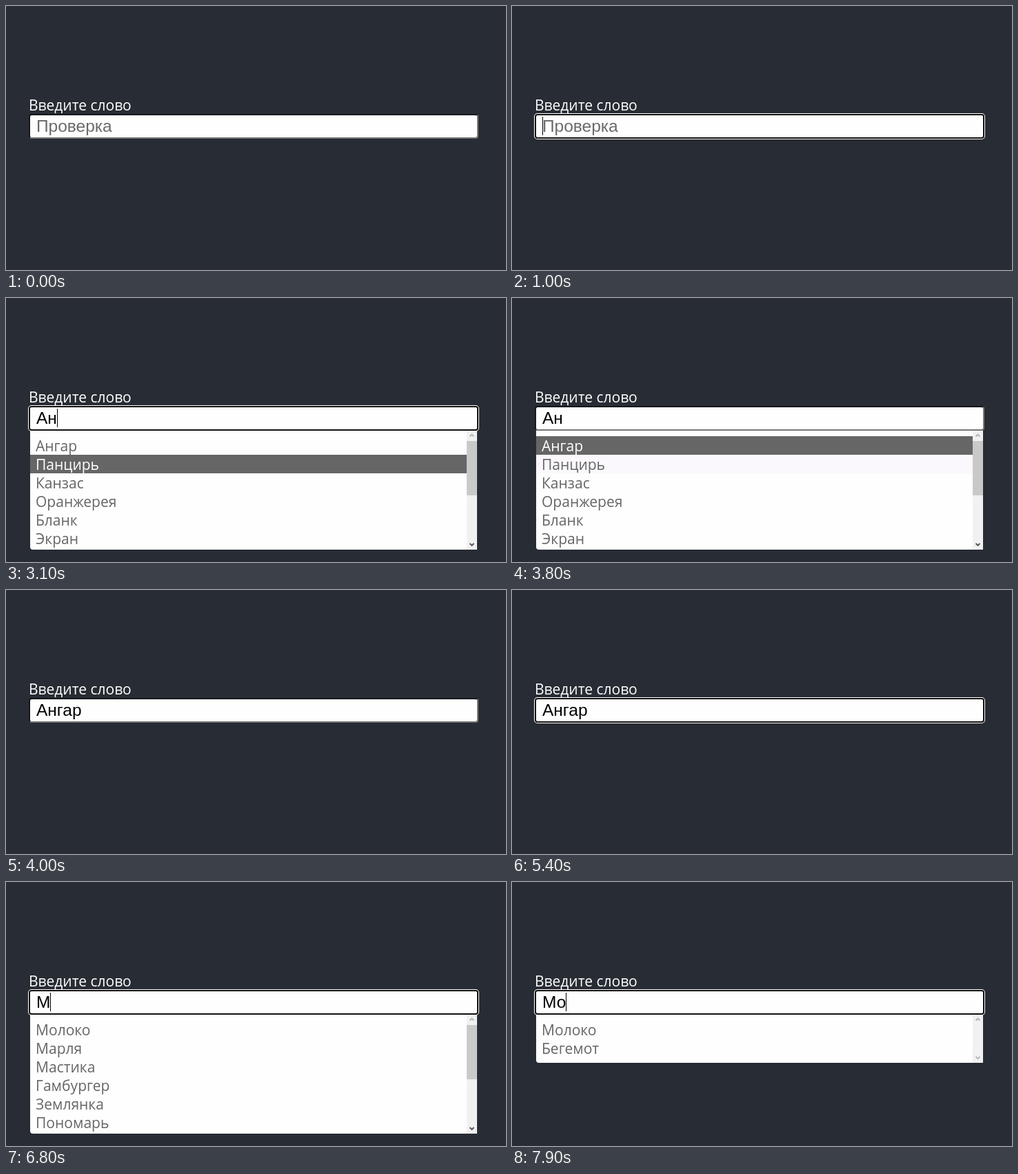
Animation of 725x384 px, one loop 8 s. Source, as an HTML page:

```html
<!DOCTYPE html>
<html lang="ru">
<head>
<meta charset="utf-8">
<title>Поиск слова</title>
<style>
  html, body { margin: 0; width: 100%; height: 100%; overflow: hidden; background: #282c34; }
  svg { position: absolute; left: 0; top: 0; width: 725px; height: 384px; }
  #field {
    position: absolute; left: 33px; top: 157px; width: 652px; height: 36px;
    box-sizing: border-box; border: 2px solid; border-radius: 4px; background: #fefefe;
    border-color: #17181c #767676 #767676 #17181c;
  }
  #field.focus { border-color: #101010; box-shadow: 0 0 0 1px #fff; }
  .ui { font: 21px "Open Sans", "Noto Sans", sans-serif; }
  .input { font: 24.5px "Liberation Sans", Arial, sans-serif; }
</style>
</head>
<body>
<div id="field"></div>
<svg viewBox="0 0 725 384">
  <text class="ui" x="33" y="152" fill="#fff">Введите слово</text>
  <rect id="selection" x="44" y="161" width="66" height="27" fill="#0078d7"/>
  <text id="value" class="input" x="44" y="183"></text>
  <rect id="caret" y="161" width="1" height="27" fill="#000"/>
  <g id="list"></g>
</svg>
<script>
const LOOP = 8000;
const TOP = 193, ROW = 27, PAD = 8;
const $ = id => document.getElementById(id);

const lists = {
  a: { words: "Ангар Автоинспектор Апартамент Абак Автовышка Нафталин", thumb: 30 },
  an: { words: "Ангар Панцирь Канзас Оранжерея Бланк Экран", thumb: 79 },
  m: { words: "Молоко Марля Мастика Гамбургер Землянка Пономарь", thumb: 79 },
  mo: { words: "Молоко Бегемот", thumb: 0 }
};

// Each step changes only the listed properties.
const steps = [
  { at: 0, text: "", list: null, hover: -1, left: -1, caret: 0, focus: false, selected: false },
  { at: 1000, focus: true, caret: 44 },
  { at: 1400, text: "А", list: "a", caret: 60 },
  { at: 1900, caret: 0 },
  { at: 2200, text: "Ан", list: "an", caret: 74 },
  { at: 2600, caret: 0 },
  { at: 3100, caret: 74, hover: 1 },
  { at: 3500, hover: 0, left: 1 },
  { at: 3600, caret: 0 },
  { at: 3800, focus: false },
  { at: 4000, text: "Ангар", list: null, hover: -1, left: -1 },
  { at: 4900, focus: true, caret: 110 },
  { at: 5400, caret: 0 },
  { at: 5700, selected: true },
  { at: 6000, selected: false, text: "", caret: 44 },
  { at: 6500, caret: 0 },
  { at: 6800, text: "М", list: "m", caret: 64 },
  { at: 7300, caret: 0 },
  { at: 7700, text: "Мо", list: "mo", caret: 78 }
];

const rect = (x, y, w, h, fill) =>
  `<rect x="${x}" y="${y}" width="${w}" height="${h}" fill="${fill}"/>`;

const chevron = (y, dir, color) =>
  `<path d="M672.5 ${y + 1.5 * dir}l3 ${-3 * dir}l3 ${3 * dir}" fill="none" stroke="${color}" stroke-width="1.8"/>`;

function drawList({ list, hover, left }) {
  if (!list) return "";
  const { words, thumb } = lists[list];
  const items = words.split(" ");
  const bottom = thumb ? 366 : TOP + 2 * PAD + items.length * ROW;
  let out = `<path d="M35 ${TOP}H683V${bottom}H39a4 4 0 0 1-4-4Z" fill="#fefefe"/>`;
  items.forEach((word, i) => {
    const y = TOP + PAD + i * ROW;
    if (i === hover) out += rect(35, y, 633, ROW, "#666");
    if (i === left) out += rect(35, y, 633, ROW, "#faf8fc");
    out += `<text class="ui" x="43" y="${y + 22}" fill="${i === hover ? "#fff" : "#666"}">${word}</text>`;
  });
  out += rect(668, TOP, 15, bottom - TOP, "#f1f1f1");
  if (thumb) out += rect(668, TOP + 15, 15, thumb, "#c9c9c9");
  out += chevron(TOP + 7, 1, "#b4b4b4");
  return out + chevron(bottom - 7.5, -1, thumb ? "#505050" : "#b4b4b4");
}

let shown = 0;

function render(time) {
  const count = steps.filter(s => s.at <= time).length;
  if (count === shown) return;
  shown = count;
  const s = Object.assign({}, ...steps.slice(0, count));
  $("field").className = s.focus ? "focus" : "";
  $("value").textContent = s.text || "Проверка";
  $("value").setAttribute("fill", s.selected ? "#fff" : s.text ? "#000" : "#6a6a6a");
  $("selection").style.display = s.selected ? "" : "none";
  $("caret").style.display = s.caret ? "" : "none";
  $("caret").setAttribute("x", s.caret);
  $("list").innerHTML = drawList(s);
}

function tick() {
  render(performance.now() % LOOP);
  requestAnimationFrame(tick);
}
tick();
</script>
</body>
</html>
```
